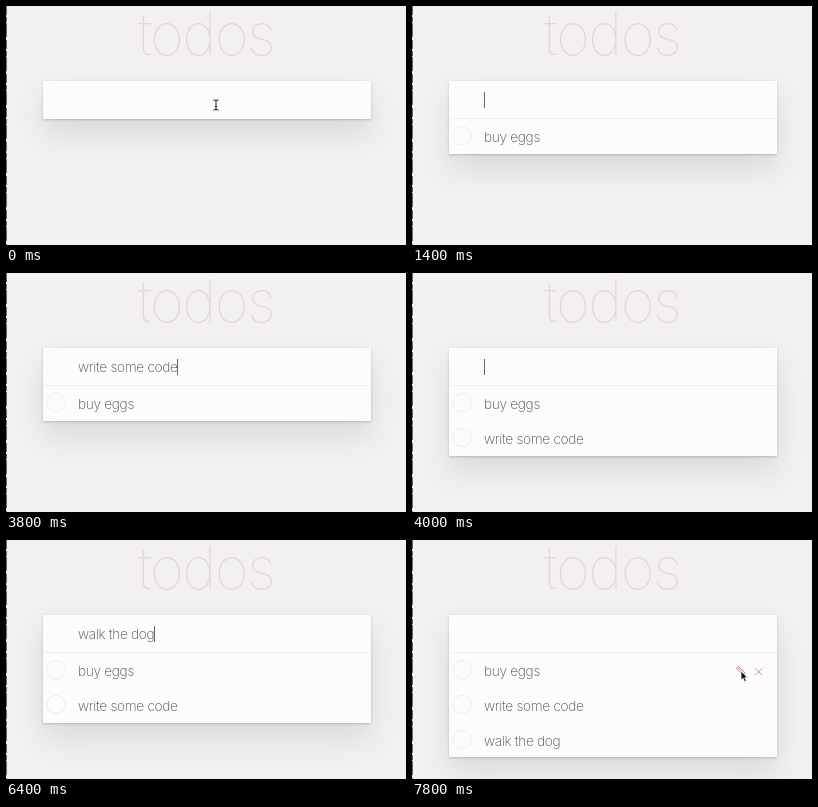
These frames come from a looping animation (400x239 px, 8 s). An HTML page:

```html
<!DOCTYPE html>
<html lang="en">
<head>
<meta charset="utf-8">
<title>todos</title>
<style>
  html, body { margin: 0; width: 100%; height: 100%; overflow: hidden; background: #f2f0f3; }
  .stage { position: relative; width: 400px; height: 239px; overflow: hidden; background: #f2f0f3; }
  .card {
    position: absolute; left: 36.5px; top: 75px; width: 328.3px; height: 38.3px;
    background: #fdfbfd;
    box-shadow: 0 1.2px 2.4px rgba(0, 0, 0, .2), 0 15px 30px rgba(0, 0, 0, .1);
  }
  svg { position: absolute; left: 0; top: 0; }
  text { font: 200 13.7px Inter, "Liberation Sans", sans-serif; letter-spacing: -.31px; fill: #4d4d4d; white-space: pre; }
  .title { font-size: 58.5px; font-weight: 100; letter-spacing: -1.6px; fill: #e5d5d5; text-anchor: middle; }
  .edge { stroke: #6c6a6d; stroke-dasharray: 9 2 5 1 14 3; }
  .rule { stroke: #efedf0; }
  .row circle { fill: none; stroke: #eeecef; }
  .tools { fill: none; stroke: #cb9494; }
  .ibeam { fill: none; stroke: #333; stroke-width: 1.1; }
  .arrow { fill: #111; stroke: #fff; stroke-width: .8; }
</style>
</head>
<body>
<div class="stage">
  <div class="card" id="card"></div>
  <svg width="400" height="239" viewBox="0 0 400 239">
    <path class="edge" d="M.5 0V239"/>
    <text class="title" x="200" y="49">todos</text>
    <path class="rule" id="rule" d="M36.5 112.6H364.8"/>
    <g id="rows"></g>
    <text id="entry" x="72" y="99"></text>
    <rect id="caret" y="86" width="1" height="16" fill="#666"/>
    <g class="tools" id="tools">
      <path d="M343.3 128.3l7 7m0-7l-7 7"/>
      <path d="M324.5 128.3l2-2 6 6 .6 2.7-2.7-.6z" fill="#ead2d3"/>
    </g>
    <path class="ibeam" id="ibeam" d="M-2.6-5Q-.4-5 0-4Q.4-5 2.6-5M0-4V4M-2.6 5Q-.4 5 0 4Q.4 5 2.6 5M-1.2 1.5H1.2"/>
    <path class="arrow" id="arrow" d="M0 0V9.2L2.1 7.3 3.7 10.8 5.4 10 3.8 6.7H6.6Z"/>
  </svg>
</div>
<script>
  const LOOP = 8000, STEP = 200, ROW = 34.7;
  const $ = id => document.getElementById(id);

  // keys: characters entered at each step from start
  const todos = [
    { text: 'buy eggs', start: 200, keys: [1, 2, 4, 5, 7, 8], added: 1400, idle: 1800 },
    { text: 'write some code', start: 2600, keys: [2, 4, 6, 9, 11, 13, 15], added: 4000, idle: 4400 },
    { text: 'walk the dog', start: 5200, keys: [1, 2, 4, 6, 8, 11, 12], added: 6800, idle: 6800 }
  ];

  // pointer route: time, x, y
  const route = [[7000, 210, 99], [7200, 222, 104], [7400, 264, 121], [7600, 308, 130], [7800, 329, 131]];

  $('rows').innerHTML = todos.map((todo, i) => `
    <g class="row" transform="translate(0 ${i * ROW})">
      <circle cx="50" cy="129.8" r="9.2"/>
      <text x="72" y="136.2">${todo.text}</text>
    </g>`).join('');
  const rows = [...document.querySelectorAll('.row')];

  const show = (el, on) => { el.style.display = on ? '' : 'none'; };

  function typed(t) {
    const todo = todos.find(d => t >= d.start && t < d.added);
    if (!todo) return '';
    const i = Math.min(Math.floor((t - todo.start) / STEP), todo.keys.length - 1);
    return todo.text.slice(0, todo.keys[i]);
  }

  function pointer(t) {
    if (t < todos[0].start) return [210, 99];
    const stop = route.filter(p => p[0] <= t).pop();
    return stop ? stop.slice(1) : null;
  }

  function draw(t) {
    const count = todos.filter(d => t >= d.added).length;
    $('card').style.height = 38.3 + ROW * count + 'px';
    show($('rule'), count > 0);
    rows.forEach((row, i) => show(row, i < count));

    const text = typed(t);
    $('entry').textContent = text;
    show($('caret'), text || todos.some(d => t >= d.added && t < d.idle));
    const width = text ? $('entry').getComputedTextLength() : 0;
    $('caret').setAttribute('x', Math.floor(72 + width));

    const pos = pointer(t);
    const hover = !!pos && pos[1] > 113;
    show($('ibeam'), pos && !hover);
    show($('arrow'), hover);
    show($('tools'), hover);
    if (pos) $(hover ? 'arrow' : 'ibeam').setAttribute('transform', `translate(${pos})`);
  }

  const begin = performance.now();
  function tick() {
    draw((performance.now() - begin) % LOOP);
    requestAnimationFrame(tick);
  }
  tick();
</script>
</body>
</html>
```
